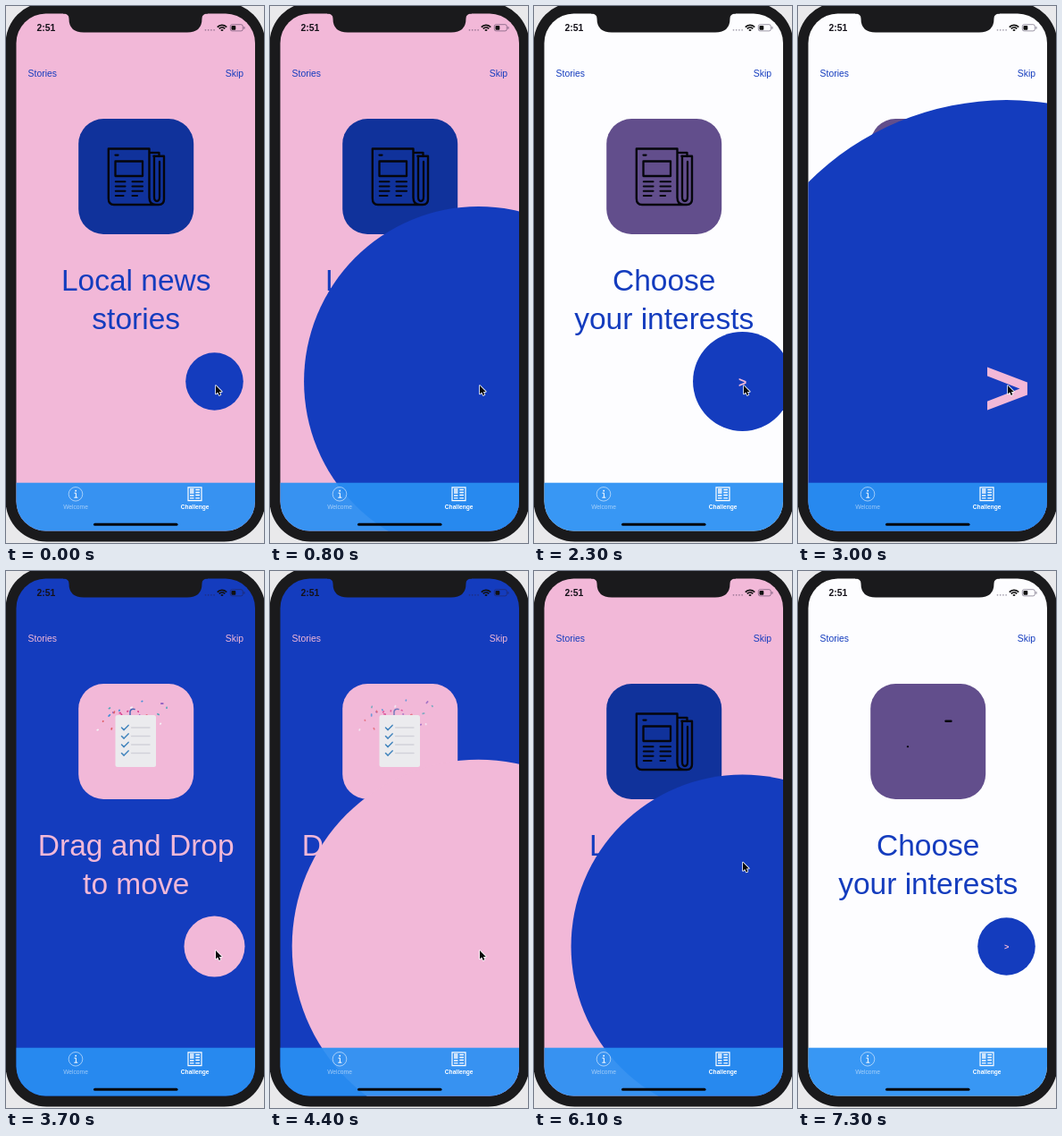
Write an HTML page with a canvas that moves like this. It is 289 by 600 pixels and loops after 7.4 s.

```html
<!DOCTYPE html>
<html lang="en">
<head>
<meta charset="utf-8">
<title>Onboarding</title>
<style>
  html, body { margin: 0; width: 100%; height: 100%; overflow: hidden; background: #e9e9eb; }
  canvas { display: block; width: 289px; height: 600px; }
</style>
</head>
<body>
<canvas id="stage"></canvas>
<script>
const LOOP = 7400, GROW = 1250, SHRINK = 450, SCROLL = 190;
const PAGE_WIDTH = 242, BUTTON = { x: 233.5, y: 419.5, r: 32.3 };
const PINK = '#f2b8d8', BLUE = '#143cbe', WHITE = '#fdfdff', DARK = '#1a1a1c';
const FONT = '"Liberation Sans", Arial, sans-serif';

const pages = [
  { bg: PINK, ink: BLUE, arrow: BLUE, card: '#10329b', lines: ['Local news', 'stories'], icon: drawNewspaper },
  { bg: WHITE, ink: BLUE, arrow: PINK, card: '#624e8c', lines: ['Choose', 'your interests'], icon: drawNewspaper },
  { bg: BLUE, ink: PINK, arrow: PINK, card: PINK, lines: ['Drag and Drop', 'to move'], icon: drawChecklist },
];

// Each scene begins when the grown circle covers the screen and the page swaps.
const scenes = [
  { page: 0, from: 0, start: -3000, icon: -3000 },
  { page: 1, from: 0, start: 1305, icon: 1305 },
  { page: 2, from: 1, start: 3270, icon: 3270 },
  { page: 0, from: 2, start: 4875, icon: 4985 },
  { page: 1, from: 0, start: 6613, icon: 7200 },
];

const canvas = document.getElementById('stage');
const ctx = canvas.getContext('2d');
const dpr = window.devicePixelRatio || 1;
canvas.width = 289 * dpr;
canvas.height = 600 * dpr;

const clamp = v => Math.max(0, Math.min(1, v));
const mix = (a, b, p) => a + (b - a) * p;
const random = n => { const v = Math.sin(n * 127.1 + 11.7) * 43758.5453; return v - Math.floor(v); };

function box(x, y, w, h, r, fill) {
  ctx.beginPath();
  ctx.roundRect(x, y, w, h, r);
  ctx.fillStyle = fill;
  ctx.fill();
}

function disc(x, y, r, fill) {
  ctx.beginPath();
  ctx.arc(x, y, r, 0, Math.PI * 2);
  ctx.fillStyle = fill;
  ctx.fill();
}

function text(str, x, y, size, fill, align = 'center', weight = 400) {
  ctx.font = `${weight} ${size}px ${FONT}`;
  ctx.textAlign = align;
  ctx.fillStyle = fill;
  ctx.fillText(str, x, y);
}

function stroke(d, color, width) {
  ctx.strokeStyle = color;
  ctx.lineWidth = width;
  ctx.stroke(new Path2D(d));
}

// Strokes the first part of a path of the given length.
function trace(d, length, progress, color, width) {
  if (progress <= 0) return;
  ctx.lineCap = ctx.lineJoin = 'round';
  ctx.setLineDash(progress < 1 ? [length * progress + 0.01, 999] : []);
  stroke(d, color, width);
  ctx.setLineDash([]);
}

function drawNewspaper(t) {
  if (t < 0) return;
  const ink = (d, length, delay, time, width = 2.3) =>
    trace(d, length, clamp((t - delay) / time), '#05060c', width);
  const outer = 'M165.5 167.8H177V216Q177 222 171 222H121Q114.8 222 114.8 215V159.5H160.5V214Q160.5 222 168 222';
  trace(outer, 286, clamp(t / 700) ** 2, '#05060c', 2.4);
  ink('M161 163.8H171.5V168', 15, 350, 200);
  ink('M166 168V213Q166 218 169 218T172 213V174', 95, 350, 350);
  ink('M122.5 173.5H153V190H122.5Z', 94, 300, 350);
  ink('M122.5 166.6H125.5', 3, 300, 80);
  [196.2, 201.5, 206.8, 212].forEach((y, row) => {
    const delay = row ? 188 + row * 2 : 98;
    const end = row === 3 ? 131.5 : 133.5;
    ink(`M122.8 ${y}H${end}`, 11, delay, 105, 2.1);
    ink(`M141.5 ${y}H${row === 3 ? 147 : 153}`, 12, delay + 160, 105, 2.1);
  });
}

function drawChecklist(t) {
  if (t < 0) return;
  const colors = ['#d63f8c', '#3f8fd8', '#f4f4f8', '#8b5bc0', '#e0606a', '#58a6b8'];
  const burst = 1 - (1 - clamp(t / 700)) ** 3;
  ctx.save();
  ctx.globalAlpha = clamp((1500 - t) / 500);
  for (let i = 0; i < 26; i++) {
    const angle = -Math.PI * (random(i) * 1.1 - 0.05);
    const reach = (18 + 32 * random(i + 40)) * burst;
    ctx.save();
    ctx.translate(146 + Math.cos(angle) * reach, 174 + Math.sin(angle) * reach * 0.7);
    ctx.rotate(random(i + 80) * 6 + t / 300);
    box(-1.5, -0.8, 2 + 1.6 * random(i + 120), 1.7, 0.7, colors[i % colors.length]);
    ctx.restore();
  }
  trace('M139 161V157Q140 153.5 144 154.5', 10, clamp(t / 200), '#4867b5', 1.5);
  ctx.restore();
  box(122.5, 161, 45.5, 58, 2.5, '#ebebee');
  [175, 184.5, 194, 203.5].forEach((y, row) => {
    const p = clamp((t - row * 70) / 150);
    trace(`M129.5 ${y}l2.6 2.6l5-5.2`, 11, p, '#4385bd', 1.5);
    trace(`M140.5 ${y}H161`, 21, p, '#d2d2d9', 1.3);
  });
}

function drawPages(scene, t) {
  const rest = (1 - clamp((t - scene.start) / SCROLL)) ** 1.55;
  const position = mix(scene.page, scene.from, rest);
  ctx.save();
  ctx.beginPath();
  ctx.rect(24.5, 90, 241.5, 443);
  ctx.clip();
  pages.forEach((page, index) => {
    if (Math.abs(index - position) >= 1) return;
    ctx.save();
    ctx.translate((index - position) * PAGE_WIDTH, 0);
    box(81.2, 126, 129, 129, 28, page.card);
    if (index === scene.page) page.icon(t - scene.icon);
    page.lines.forEach((line, i) => text(line, 145.7, 318 + i * 42.5, 33.5, page.ink));
    ctx.restore();
  });
  ctx.restore();
}

function drawButton(page, scene, next, t) {
  const shrink = (1 - clamp((t - scene.start) / SHRINK)) ** 3;
  const grow = next ? clamp((t - next.start + GROW) / GROW) ** 2 : 0;
  const r = BUTTON.r + 458 * Math.max(shrink, grow);
  disc(BUTTON.x, BUTTON.y, r, page.ink);
  if (page.arrow === page.ink) return;
  ctx.save();
  ctx.translate(BUTTON.x, BUTTON.y);
  ctx.scale(r / BUTTON.r, r / BUTTON.r);
  text('>', 0.1, 3.9, 9.2, page.arrow, 'center', 700);
  ctx.restore();
}

function drawTabBar() {
  ctx.fillStyle = 'rgba(41,144,244,.93)';
  ctx.fillRect(11, 532.7, 268, 55);
  const dim = 'rgba(255,255,255,.55)';
  ctx.beginPath();
  ctx.arc(78, 545.3, 7.8, 0, Math.PI * 2);
  ctx.strokeStyle = dim;
  ctx.lineWidth = 1;
  ctx.stroke();
  disc(78.2, 541.7, 0.9, '#fff');
  ctx.lineCap = 'butt';
  stroke('M76.5 544.2H78.4V549M76.3 549.2H80.3', '#fff', 1);
  text('Welcome', 78, 562.3, 6.7, dim);

  stroke('M204 537.8H219V552.6H204Z', '#fff', 1.2);
  stroke('M206 540H210.5M206 542H210.5M206 544H210.5M206 547H210.5M206 549.8H210.5' +
    'M212.3 540.5H217M212.3 543.5H217M212.3 546.5H217M212.3 549.8H217', '#fff', 1.3);
  text('Challenge', 211.6, 562.3, 6.6, '#fff', 'center', 700);
  box(98, 577.8, 94.5, 3, 1.5, '#05070c');
}

function drawStatus() {
  text('2:51', 34.5, 28, 10.4, '#15121a', 'left', 700);
  for (let i = 0; i < 4; i++) disc(223.5 + i * 3.2, 26.8, 0.9, 'rgba(40,30,60,.4)');
  ctx.lineCap = 'butt';
  [2, 5, 7.7].forEach(r => {
    ctx.beginPath();
    ctx.arc(242, 28.5, r - 0.5, -Math.PI * 0.76, -Math.PI * 0.24);
    ctx.strokeStyle = '#111';
    ctx.lineWidth = 1.7;
    ctx.stroke();
  });
  ctx.beginPath();
  ctx.roundRect(251.3, 20.7, 14, 7.2, 2);
  ctx.strokeStyle = 'rgba(40,30,60,.5)';
  ctx.lineWidth = 0.9;
  ctx.stroke();
  box(252.5, 21.9, 4.8, 4.8, 1, '#111');
  box(266.3, 23, 1.2, 2.8, 0.6, 'rgba(40,30,60,.5)');
}

function drawNotch() {
  ctx.fillStyle = DARK;
  ctx.fill(new Path2D('M64 7H226V8.5Q219.5 8.5 219.5 14Q219.5 29.5 203 29.5H87Q70.5 29.5 70.5 14Q70.5 8.5 64 8.5Z'));
}

function drawCursor(t) {
  if (t > 7250) return;
  const up = clamp((t - 5650) / 400), drift = clamp((t - 6150) / 1000);
  const x = mix(mix(235, 234, up), 226, drift);
  const y = mix(mix(424, 325.5, up), 339, drift);
  ctx.save();
  ctx.translate(x, y);
  const arrow = new Path2D('M0 0V9.6L2.2 7.6L3.7 11L5.4 10.2L3.9 6.9H6.8Z');
  ctx.lineJoin = 'round';
  ctx.strokeStyle = '#fff';
  ctx.lineWidth = 1.5;
  ctx.stroke(arrow);
  ctx.fillStyle = '#08080a';
  ctx.fill(arrow);
  ctx.restore();
}

function draw(t) {
  const current = scenes.findLastIndex(s => t >= s.start);
  const scene = scenes[current], page = pages[scene.page];
  ctx.setTransform(dpr, 0, 0, dpr, 0, 0);
  ctx.fillStyle = '#e9e9eb';
  ctx.fillRect(0, 0, 289, 600);
  box(-0.5, -4, 291, 602.5, 46, DARK);

  ctx.save();
  ctx.beginPath();
  ctx.roundRect(11.5, 8.5, 267.5, 578, 33);
  ctx.clip();
  ctx.fillStyle = page.bg;
  ctx.fillRect(11, 8, 269, 579);
  drawPages(scene, t);
  drawButton(page, scene, scenes[current + 1], t);
  text('Stories', 24.6, 79, 10.4, page.ink, 'left');
  text('Skip', 266, 79, 10.4, page.ink, 'right');
  drawTabBar();
  drawStatus();
  ctx.restore();

  drawNotch();
  drawCursor(t);
}

function tick() {
  draw(performance.now() % LOOP);
  requestAnimationFrame(tick);
}
tick();
</script>
</body>
</html>
```
